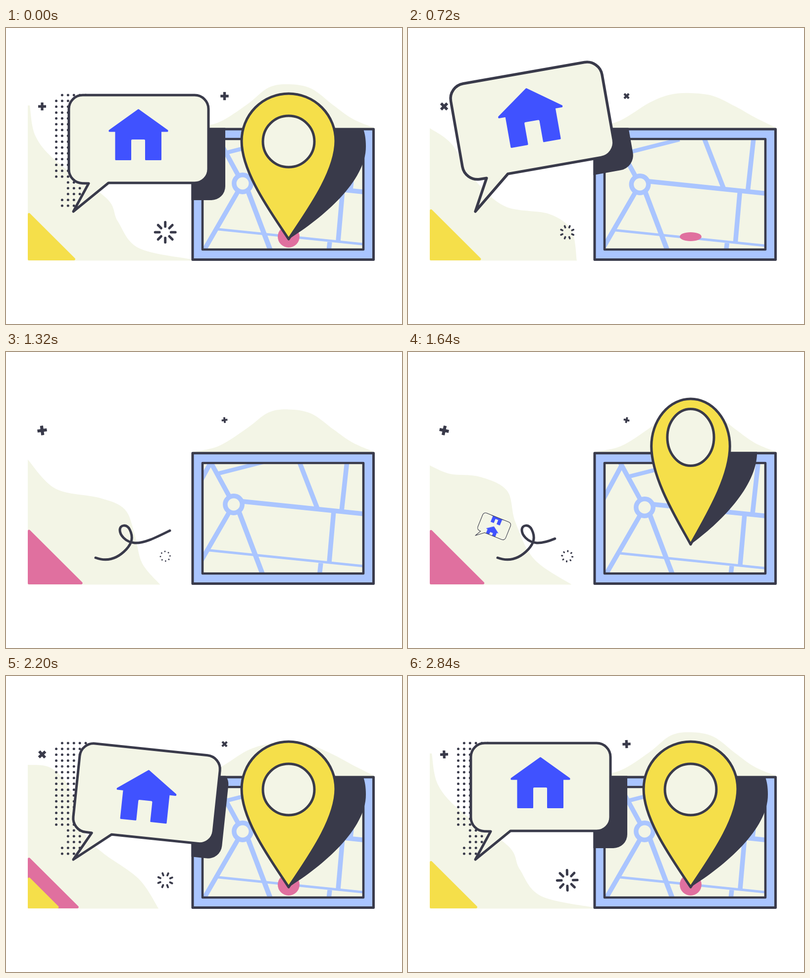
Animation of 800 by 600 pixels, one loop 2.88 s. Source, as an HTML page with a canvas:

```html
<!DOCTYPE html>
<html lang="en">
<head>
<meta charset="utf-8">
<title>Home on the map</title>
<style>
  html, body { margin: 0; width: 100%; height: 100%; overflow: hidden; background: #fff; }
  canvas { display: block; width: 800px; height: 600px; }
</style>
</head>
<body>
<canvas id="stage" width="800" height="600"></canvas>
<script>
const ctx = document.getElementById('stage').getContext('2d');
const LOOP = 2880, STEP = 40, TAU = Math.PI * 2;
const INK = '#393a4a', CREAM = '#f3f5e6', YELLOW = '#f5df4a',
      PINK = '#e0709f', BLUE = '#aac5ff', HOUSE = '#4052ff';

const clamp = v => Math.max(0, Math.min(1, v));
const quad = x => x < .5 ? 2 * x * x : 1 - 2 * (1 - x) ** 2;
const ramp = (t, from, to) => quad(clamp((t - from) / (to - from)));
const hash = n => { const v = Math.sin(n * 12.9898) * 43758.5453; return v - Math.floor(v); };
const closed = rows => [...rows, [LOOP, ...rows[0].slice(1)]];

// Smooth interpolation without overshoot; rows are [time, ...values], held outside their range.
function track(t, rows) {
  let i = 0;
  while (i < rows.length - 2 && t >= rows[i + 1][0]) i++;
  const a = rows[i], b = rows[i + 1], span = b[0] - a[0];
  const u = clamp((t - a[0]) / span);
  const slope = (k, j) => rows[k] && rows[k + 1]
    ? (rows[k + 1][j] - rows[k][j]) / (rows[k + 1][0] - rows[k][0]) : 0;
  const tangent = (k, j) => {
    const p = slope(k - 1, j), q = slope(k, j);
    return p * q > 0 ? 2 * p * q / (p + q) : 0;
  };
  return a.slice(1).map((v, n) => {
    const j = n + 1, d = 1 - u;
    return v * (1 + 2 * u) * d * d + b[j] * u * u * (3 - 2 * u)
      + span * (tangent(i, j) * u * d * d - tangent(i + 1, j) * u * u * d);
  });
}

// Outline points x, y of the left patch
const BLOB = closed([
  [0, 48, 157, 60, 220, 105, 273, 203, 345, 226, 392, 268, 446, 375, 469],
  [720, 44, 203, 88, 235, 130, 302, 195, 361, 285, 377, 330, 410, 341, 471],
  [920, 44, 193, 78, 229, 125, 307, 190, 343, 258, 351, 308, 398, 322, 471],
  [1320, 44, 218, 100, 277, 190, 296, 240, 319, 260, 370, 275, 428, 311, 471],
  [1640, 44, 230, 85, 247, 145, 253, 200, 281, 217, 345, 255, 420, 330, 471],
  [2200, 44, 180, 90, 186, 130, 230, 160, 320, 195, 358, 268, 411, 308, 471]
]);
const HILL_X = [375, 430, 487, 530, 571, 617, 662, 700, 745];
const HILL_Y = [
  [0, 203, 191, 155, 121, 114, 123, 157, 184, 203],
  [1, 203, 186, 151, 139, 137, 142, 160, 180, 203]
];
const HILL_FLAT = closed([[0, 0], [720, .7], [920, 1], [1320, .2], [1640, .1], [2200, .85]]);
const BURST = closed([[0, 1], [720, .36], [920, .14], [1320, 0], [1640, .12], [2200, .5]]);
const MAP = [[600, 0, 0], [720, -9.5, 2], [920, -37, -84], [1020, -41, -95], [1320, -18, -6], [1600, 0, 0]];
// scale, angle
const BUBBLE = [
  [200, 1, 0], [560, 1.1, -10], [720, 1.1, -10], [920, .22, 23.5], [980, 0, 25],
  [1600, 0, 25], [1640, .215, 22], [1840, 1.1, -10], [2200, 1.01, 6], [2500, 1, 0]
];
const BUBBLE_SHADOW = [[200, 34, 35], [560, 39, 26], [1840, 39, 26], [2200, 17, 30], [2500, 34, 35]];
const HOUSE_IN = [[1599, 0], [1600, -133], [1640, -70], [1760, 8], [1960, -5], [2200, 13], [2460, 0]];
const HOUSE_OUT = [[1599, 200], [1600, 0], [1640, 63], [1720, 200]];
// lift, size
const PIN = [[460, 0, 1], [640, 2.6, 1], [680, 2.6, 0], [1500, 2.1, 0], [1560, 2.1, 1], [1640, 1, 1], [1720, 0, 1]];
const SPOT = [[640, 1], [720, .41], [780, 0], [1680, 0], [1800, 1]];
// x1, y1, x2, y2, width; relative to the roundabout
const ROADS = [
  [0, -8, 300, 23, 9.5], [0, 0, -95, 165, 9.5], [5, 0, 91, 228, 10], [-54, 92.5, 300, 129, 5],
  [202, 14, 193, 117, 9.5], [176, 119, 163, 235, 9.5], [125, -106, 169, 8, 9.5], [231, -106, 218, 13, 9.5],
  [-30, -63, 80, -91, 8], [0, 0, -50, -92, 9.5], [-46, -86, -95, 5, 9.5], [64, 157, -50, 193, 8]
];

const path = d => new Path2D(d);

function bubblePath(tail) {
  const p = new Path2D();
  p.moveTo(155, 136);
  p.arcTo(409, 136, 409, 314, 28);
  p.arcTo(409, 314, 127, 314, 28);
  if (tail) { p.lineTo(207, 314); p.lineTo(136, 372); p.lineTo(167, 315); }
  p.arcTo(127, 314, 127, 136, 28);
  p.arcTo(127, 136, 409, 136, 28);
  p.closePath();
  return p;
}

const BODY = bubblePath(false), BALLOON = bubblePath(true);
const HOME = path('M267.5 166L326 208V209H312.5V266.5H282.5V228Q282.5 224.5 279 224.5H255Q251.5 224.5 251.5 228V266.5H222V209H209V208Z');
const PIN_SHADOW = path('M0 0C69 -43 157 -118 156 -188C156 -203 154 -216 150 -225L60 -225L0 -150Z');
const CURL = path('M331 362C305 375 280 388 260 387C240 385 230 370 230 361C230 350 244 348 250 360C258 376 254 388 243 400C228 416 208 427 181 417');
const CURL_LENGTH = 245;

function scoped(draw) { ctx.save(); draw(); ctx.restore(); }

function paint(shape, fill, stroke, width) {
  if (fill) { ctx.fillStyle = fill; shape ? ctx.fill(shape) : ctx.fill(); }
  if (stroke) { ctx.strokeStyle = stroke; ctx.lineWidth = width; shape ? ctx.stroke(shape) : ctx.stroke(); }
}

function line(x1, y1, x2, y2) {
  ctx.beginPath(); ctx.moveTo(x1, y1); ctx.lineTo(x2, y2); ctx.stroke();
}

function box(x, y, w, h) { ctx.beginPath(); ctx.rect(x, y, w, h); }

function oval(x, y, rx, ry = rx) { ctx.beginPath(); ctx.ellipse(x, y, rx, ry, 0, 0, TAU); }

// Continues the current path through a flat list of x, y pairs.
function spline(v) {
  const n = v.length / 2;
  const at = k => { k = Math.max(0, Math.min(n - 1, k)); return [v[2 * k], v[2 * k + 1]]; };
  ctx.lineTo(v[0], v[1]);
  for (let k = 0; k < n - 1; k++) {
    const [p, a, b, q] = [at(k - 1), at(k), at(k + 1), at(k + 2)];
    ctx.bezierCurveTo(a[0] + (b[0] - p[0]) / 6, a[1] + (b[1] - p[1]) / 6,
      b[0] - (q[0] - a[0]) / 6, b[1] - (q[1] - a[1]) / 6, b[0], b[1]);
  }
}

function drawHill(t) {
  const ys = track(track(t, HILL_FLAT)[0], HILL_Y);
  ctx.beginPath();
  ctx.moveTo(375, 210);
  spline(HILL_X.flatMap((x, i) => [x, ys[i]]));
  ctx.lineTo(745, 210);
  paint(null, CREAM);
}

function drawBlob(t) {
  const edge = track(t, BLOB);
  scoped(() => {
    box(44, 0, 400, 471.5); ctx.clip();
    ctx.beginPath();
    ctx.moveTo(44, 472);
    ctx.lineTo(44, edge[1]);
    spline(edge);
    ctx.lineTo(edge[edge.length - 2], 472);
    paint(null, CREAM);
  });
}

function triangle(size, color) {
  if (size <= 4) return;
  const s = size - 4;
  ctx.beginPath();
  ctx.moveTo(46.5, 468.5); ctx.lineTo(46.5, 468.5 - s); ctx.lineTo(46.5 + s, 468.5);
  ctx.closePath();
  paint(null, color, color, 5);
}

function drawTriangles(t) {
  const size = 95 + 15 * Math.sin(Math.PI * t / LOOP) ** 2;
  const pink = ramp(t, 860, 1220), yellow = ramp(t, 2000, 2360);
  if (pink < 1) triangle(size, YELLOW);
  if (yellow < 1) triangle(size * pink, PINK);
  triangle(size * yellow, YELLOW);
}

function drawDots(t) {
  ctx.fillStyle = INK;
  for (let r = 0; r < 20; r++) {
    const first = r === 0 || r > 17 ? 1 : r > 14 ? 2 : 0;
    const last = r === 19 ? 3 : r > 14 ? 4 : 5;
    for (let c = first; c <= last; c++) {
      const h = hash(r * 7 + c + 1);
      const shown = t < LOOP / 2 ? 1 - clamp((t - 300 - h * 250) / 120) : clamp((t - 1880 - h * 215) / 120);
      if (!shown) continue;
      ctx.globalAlpha = shown;
      oval(101.5 + 11.9 * c, 136 + 11.8 * r, 2.5);
      ctx.fill();
    }
  }
  ctx.globalAlpha = 1;
}

function drawMap(t) {
  const [dx, dy] = track(t, MAP);
  box(377, 205, 365.5, 264.5);
  paint(null, BLUE, INK, 5);
  scoped(() => {
    box(397, 225, 325, 224);
    paint(null, CREAM);
    ctx.clip();
    scoped(() => {
      ctx.translate(478 + dx, 315 + dy);
      ctx.strokeStyle = BLUE;
      ctx.lineCap = 'butt';
      for (const [x1, y1, x2, y2, width] of ROADS) { ctx.lineWidth = width; line(x1, y1, x2, y2); }
      oval(0, 0, 17.2);
      paint(null, CREAM, BLUE, 9.5);
    });
    const spot = track(t, SPOT)[0];
    if (spot > 0) { oval(571, 423, 22, 22 * spot); paint(null, PINK); }
  });
  box(397, 225, 325, 224);
  paint(null, null, INK, 4.6);
}

function placeBubble(scale, angle) {
  ctx.translate(136, 372);
  ctx.rotate(angle * Math.PI / 180);
  ctx.scale(scale, scale);
  ctx.translate(-136, -372);
}

function drawShadows(t) {
  const [scale, angle] = track(t, BUBBLE), [lift, size] = track(t, PIN);
  scoped(() => {
    box(374.5, 202.5, 370.5, 269.5); ctx.clip();
    if (size > 0) scoped(() => {
      ctx.translate(571, 428 - 38 * lift);
      ctx.scale((1 - .14 * lift) * size, size);
      paint(PIN_SHADOW, INK);
    });
    if (scale > 0) scoped(() => {
      ctx.translate(...track(t, BUBBLE_SHADOW));
      placeBubble(scale, angle);
      paint(BODY, INK);
    });
  });
}

function drawPin(t) {
  const [lift, size] = track(t, PIN);
  if (size <= 0) return;
  const sx = (1 - .165 * lift) * size, k = Math.min(lift, 1);
  const x = v => v * sx, y = v => v * size;
  scoped(() => {
    ctx.translate(571, 428 - 38 * lift);
    ctx.beginPath();
    ctx.moveTo(0, 0);
    ctx.bezierCurveTo(x(-31), y(-48), x(-95), y(-133), x(-95), y(-199));
    ctx.ellipse(0, y(-199), x(95), y(96), 0, Math.PI, TAU);
    ctx.bezierCurveTo(x(95), y(-133), x(31), y(-48), 0, 0);
    ctx.closePath();
    paint(null, YELLOW, INK, 5 * size);
    oval(0, y(-198 - 19 * k), x(52 + 4.4 * lift), y(52 + 5.5 * k));
    paint(null, CREAM, INK, 5 * size);
  });
}

function drawBubble(t) {
  const [scale, angle] = track(t, BUBBLE);
  if (scale <= 0) return;
  scoped(() => {
    placeBubble(scale, angle);
    paint(BALLOON, CREAM);
    scoped(() => {
      ctx.clip(BODY);
      for (const keys of [HOUSE_IN, HOUSE_OUT]) scoped(() => {
        ctx.translate(0, track(t, keys)[0]);
        paint(HOME, HOUSE, HOUSE, 3);
      });
    });
    paint(BALLOON, null, INK, 5);
  });
}

function drawCurl(t) {
  if (t < 920 || t >= 1900) return;
  const head = Math.max(.002, ramp(t, 920, 1280)), tail = ramp(t, 1540, 1900);
  scoped(() => {
    ctx.setLineDash([(head - tail) * CURL_LENGTH * (head === 1 ? 1.2 : 1), 1000]);
    ctx.lineDashOffset = -tail * CURL_LENGTH;
    paint(CURL, null, INK, 5);
  });
}

function cross(x, y, angle, scale) {
  scoped(() => {
    ctx.translate(x, y);
    ctx.rotate(angle);
    ctx.scale(scale, scale);
    ctx.fillStyle = INK;
    ctx.fillRect(-8, -2.6, 16, 5.2);
    ctx.fillRect(-2.6, -8, 5.2, 16);
  });
}

function drawBurst(t) {
  const p = track(t, BURST)[0];
  scoped(() => {
    ctx.translate(321.7, 414);
    ctx.rotate(t / LOOP * Math.PI / 2);
    ctx.strokeStyle = INK;
    ctx.lineWidth = 2.8 + 2.2 * p;
    for (let i = 0; i < 8; i++) {
      ctx.rotate(TAU / 8);
      line(9.6 + 2 * p, 0, 9.8 + 10.7 * p, 0);
    }
  });
}

function draw(t) {
  ctx.clearRect(0, 0, 800, 600);
  ctx.lineJoin = ctx.lineCap = 'round';
  drawHill(t);
  drawBlob(t);
  drawTriangles(t);
  drawDots(t);
  drawMap(t);
  drawShadows(t);
  drawPin(t);
  drawBubble(t);
  drawCurl(t);
  const phase = Math.PI * t / LOOP, swell = Math.sin(phase);
  cross(73, 159, phase, 1 + .2 * swell * swell);
  cross(441.5, 138, phase, 1.03 - .3 * swell);
  drawBurst(t);
}

const start = performance.now();
function tick() {
  const t = (performance.now() - start) % LOOP;
  draw(Math.floor(t / STEP) * STEP);
  requestAnimationFrame(tick);
}
tick();
</script>
</body>
</html>
```
